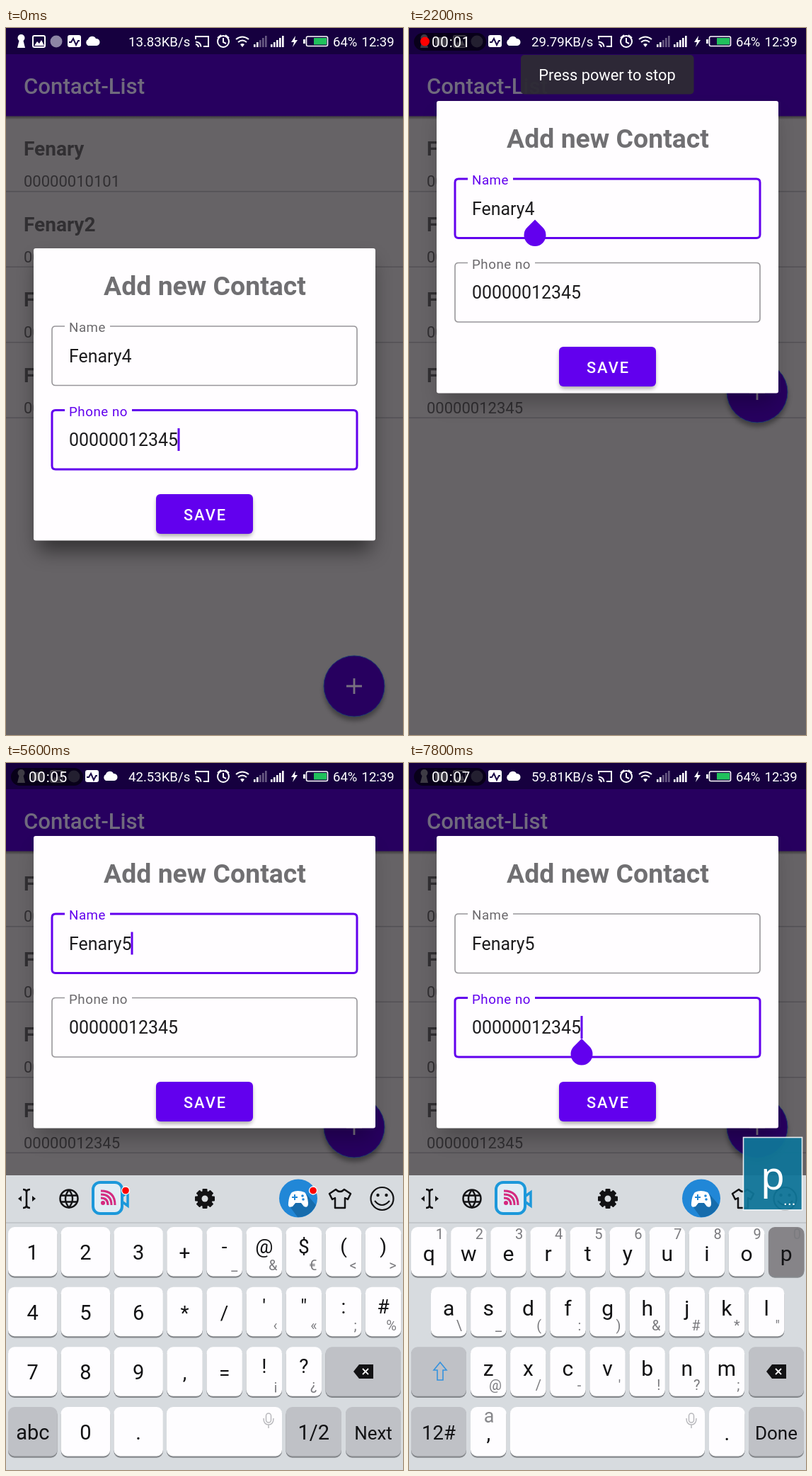
An HTML page that plays this animation: 561 by 998 pixels, repeating every 8 s.

```html
<!DOCTYPE html>
<html lang="en">
<head>
<meta charset="utf-8">
<title>Contact list</title>
<style>
  html, body { margin: 0; width: 100%; height: 100%; overflow: hidden; background: #666366; }
  svg { display: block; width: 100vw; height: 100vh; font-family: Roboto, sans-serif; }
  text { white-space: pre; }
</style>
</head>
<body>
<svg id="stage" viewBox="0 0 561 998">
  <defs>
    <filter id="soft" x="-30%" y="-30%" width="160%" height="160%"><feGaussianBlur stdDeviation="14"/></filter>
    <filter id="small" x="-30%" y="-30%" width="160%" height="160%"><feGaussianBlur stdDeviation="3"/></filter>
    <linearGradient id="barShade" x2="0" y2="1"><stop stop-opacity=".4"/><stop offset="1" stop-opacity="0"/></linearGradient>
  </defs>
  <g id="scene"></g>
</svg>
<script>
const LOOP = 8000, PURPLE = '#6200ee', NAME = 'Fenary', PHONE = '00000012345';
const scene = document.getElementById('scene');

const clamp = v => Math.max(0, Math.min(1, v));
const ramp = (t, from, to) => clamp((t - from) / (to - from));
const ease = v => 1 - (1 - v) ** 3;
const within = (t, a, b) => t >= a && t < b;
const at = (t, steps) => steps.filter(s => s[0] <= t).pop()[1];
const esc = s => s.replace(/&/g, '&amp;').replace(/</g, '&lt;');

const text = (x, y, s, size, fill = '#fff', extra = '') =>
  `<text x="${x}" y="${y}" font-size="${size}" fill="${fill}" ${extra}>${esc(s)}</text>`;
const rect = (x, y, w, h, fill, r = 0, extra = '') =>
  `<rect x="${x}" y="${y}" width="${w}" height="${h}" rx="${r}" fill="${fill}" ${extra}/>`;
const disc = (x, y, r, fill, extra = '') => `<circle cx="${x}" cy="${y}" r="${r}" fill="${fill}" ${extra}/>`;
const fillPath = (d, fill) => `<path d="${d}" fill="${fill}"/>`;
const line = (d, color, width = 2, extra = '') =>
  `<path d="${d}" fill="none" stroke="${color}" stroke-width="${width}" ${extra}/>`;
const move = (x, y, inner, scale = 1) => `<g transform="translate(${x} ${y}) scale(${scale})">${inner}</g>`;
const MID = 'text-anchor="middle"', END = 'text-anchor="end"', BOLD = 'font-weight="700"', MEDIUM = 'font-weight="500"';

// Status bar
function signal(x, lit) {
  return [0, 1, 2, 3, 4].map(i =>
    rect(x + i * 4, 23 - i * 3, 2.6, 4 + i * 3, '#fff', 0, `opacity="${i < lit ? 1 : .35}"`)).join('');
}

function statusBar(t) {
  const speed = at(t, [[0, '13.83'], [1200, '29.79'], [2600, '27.78'], [4600, '42.53'], [6400, '32.75'], [7600, '59.81']]);
  const extraIcon = t >= 2200, shift = extraIcon ? 25 : 0;
  let s = rect(0, 0, 561, 37, '#16003f');
  s += disc(21.5, 14, 5, '#fff') + fillPath('M19 16h5l3 12H16z', '#fff');
  if (extraIcon) s += rect(37, 13, 17, 12, '#fff', 2);
  s += move(shift, 0,
    line('M40 11h13a2 2 0 0 1 2 2v12a2 2 0 0 1-2 2H40a2 2 0 0 1-2-2V13a2 2 0 0 1 2-2z', '#fff') +
    fillPath('M40 25l4-6 3 3 3-5 4 8z', '#fff') + disc(71, 19, 8.5, '#8d86a5') +
    rect(87, 10, 19, 17, '#fff', 3) + line('M89 20h3l3-5 4 9 3-6h2', '#1c0b48') +
    fillPath('M116 25a5 5 0 0 1 0-9 6 6 0 0 1 11-1 5 5 0 0 1 1 10z', '#fff'));
  if (t >= 400) {
    s += rect(7, 7, 102, 25, '#05000d', 12.5, 'opacity=".77"');
    const sec = Math.max(0, Math.floor((t - 600) / 1000));
    if (Math.floor((t + 800) / 1000) % 2) s += disc(22.5, 19, 6.5, '#f00');
    s += text(32, 26.5, '00:0' + sec, 20.5, '#fff', 'letter-spacing=".8"');
  }
  s += text(173, 26, speed + 'KB/s', 18.6);
  s += line('M268 16v-4h18v14h-7M268 19.500q7 .5 7.500 7M268 23q3.500.5 4 4', '#fff');
  s += line('M307 14v6l4 2M299 14l5-4M315 14l-5-4', '#fff') + disc(307, 19, 8, 'none', 'stroke="#fff" stroke-width="2"');
  s += line('M325 16q9-7 18 0M328 20q6-5 12 0', '#fff') + fillPath('M331 23q3-2 6 0l-3 4z', '#fff');
  s += signal(350, 2) + signal(374, 5);
  s += fillPath('M409 11l-6 9h4l-2 7 7-10h-4z', '#fff');
  s += rect(424.5, 12, 30, 13.500, 'none', 2, 'stroke="#fff" stroke-width="1.6"') + rect(420, 16, 3, 6, '#fff') +
    rect(435, 14, 18, 9.500, '#20c05c');
  return s + text(462, 26, '64%', 18.5) + text(502.500, 26, '12:39', 18.5);
}

// Dimmed contact list
function contacts(lifted) {
  let s = rect(0, 0, 561, 998, '#666366') + rect(0, 37, 561, 87.500, '#27005f') +
    rect(0, 124.500, 561, 5, 'url(#barShade)') + text(25, 93, 'Contact-List', 31.2, '#706a7d', MEDIUM);
  ['', '2', '3', '4'].forEach((suffix, i) => {
    const y = i * 106.500;
    s += text(25, 180 + y, NAME + suffix, 28, '#312f32', BOLD) +
      text(25, 224 + y, i ? PHONE : '00000010101', 22, '#312f32') + rect(0, 230 + y, 561, 1.500, '#535155');
  });
  const y = lifted ? 514 : 929;
  return s + disc(492, y + 6, 43, '#000', 'opacity=".35" filter="url(#small)"') +
    disc(492, y, 43, '#27005f', 'stroke="#1d3c72" stroke-width="1"') +
    line(`M481 ${y}h22M492 ${y - 11}v22`, '#787080', 2.800);
}

// Dialog
function field(y, label, notch, value, focused) {
  const color = focused ? PURPLE : '#98969a';
  return line(`M${notch} ${y}H491q5 0 5 5v73.500q0 5-5 5H70q-5 0-5-5V${y + 5}q0-5 5-5H83`, color, focused ? 3 : 1.600) +
    text(89, y + 8, label, 18.7, focused ? PURPLE : '#6b696c', 'letter-spacing=".56"') +
    text(89, y + 50.500, value, 24.9, '#1d1c1e');
}

function dialog(t, lift) {
  const onPhone = t < 1000 || t >= 6000;
  const name = NAME + (t < 3400 ? '4' : t < 5400 ? '' : '5');
  const caretOn = at(t, [[0, 1], [400, 0], [1000, 1], [1400, 0], [2400, 1], [4800, 0], [5200, 1], [6800, 0], [7600, 1]]);
  const handleOn = within(t, 1000, 3400) || t >= 6000;
  const caretX = onPhone ? 244 : name.length > NAME.length ? 178 : 164;
  const dy = onPhone ? 118.500 : 0;
  let s = rect(45, 330, 471, 408, '#000', 4, `opacity="${.5 - .25 * lift}" filter="url(#soft)"`) +
    rect(39, 311, 483, 412.500, '#fffdff', 3) +
    text(281, 377, 'Add new Contact', 37.4, '#706f72', MID + ' ' + BOLD) +
    field(421, 'Name', 147, name, !onPhone) + field(539.500, 'Phone no', 178, PHONE, onPhone) +
    rect(213, 662, 135, 55, '#000', 6, 'opacity=".35" filter="url(#small)"') +
    rect(212, 658, 137, 56, PURPLE, 6) + text(251, 694.500, 'SAVE', 21.8, '#fff', MEDIUM + ' letter-spacing="1.95"');
  if (caretOn) s += rect(caretX - 1.500, 446.500 + dy, 3, 32, PURPLE);
  if (handleOn) s += move(caretX, 478.500 + dy, fillPath('M0 0L11 11A15.500 15.500 0 1 1-11 11Z', PURPLE));
  return move(0, -208 * lift, s);
}

// Keyboard
const ROWS = [655, 739.700, 824.300, 909], INK = '#121214', STEP = 56.1;

function key(x, row, w, label = '', o = {}) {
  const y = ROWS[row];
  const fill = o.pressed ? '#868488' : o.grey ? '#bfc1c6' : '#fefdff';
  let s = rect(x, y + 1.700, w, 70, '#85888c', 9) + rect(x, y, w, 69.500, fill, 9);
  s += text(x + w / 2, y + (o.base || 46), label, o.size || 29, INK, MID);
  if (o.hint) s += text(x + (o.top ? 46 : 44), y + (o.top ? 17 : 61), o.hint, 20, '#7b7b7f', END);
  return s;
}

const backspace = (x, y, scale = 1) => move(x, y,
  fillPath('M-14 0L-6-10H14V10H-6Z', INK) + line('M-1-4l8 8M7-4l-8 8', '#fff', 1.800), scale);
const mic = x => rect(x - 3.500, 918, 7, 13, 'none', 3.500, 'stroke="#b9b9bd" stroke-width="1.5"') +
  line(`M${x - 7} 925q0 9 7 9t7-9M${x} 934v5`, '#b9b9bd', 1.500);

function letterKeys(t) {
  const late = t >= 7400;
  const letters = (chars, hints, x, row, base) => [...chars].map((c, i) => key(x + i * STEP, row, 50.500, c, {
    hint: hints[i], top: !row, base, size: 30, pressed: t >= 7800 && c === 'p'
  })).join('');
  const accent = '#88888c';
  return letters('qwertyuiop', '1234567890', 3, 0, 48) +
    letters('asdfghjkl', '\\_(:)&#*"', 31, 1, 40) +
    key(3, 2, 78, '', { grey: 1 }) + line('M44 846l9 11h-5v14h-8v-14h-5z', '#3592de', 1.600) +
    letters('zxcvbnm', "@/-'!?;", 87, 2, 41) +
    key(480, 2, 78, '', { grey: 1, pressed: within(t, 3200, 3400) }) + backspace(519, 859) +
    key(3, 3, 78, '12#', { grey: 1, size: 27.5, pressed: within(t, 4200, 4400) }) +
    key(87, 3, 50.500, ',', { base: 47 }) + text(113, 931, 'a', 27, accent, MID) +
    (late ? '' : line('M110 932l5 5 9-9', accent)) +
    key(143, 3, 275) + mic(399) + key(424, 3, 50.500, '.', { base: 47 }) +
    key(480, 3, 78, late ? 'Done' : 'Next', { grey: 1, size: 26 });
}

function symbolKeys(t) {
  const rows = [['123', '+-@$()', ' _&€<>'], ['456', '*/\'":#', '  ‹«;%'], ['789', ',=!?', '  ¡¿']];
  let s = rows.map(([digits, signs, hints], row) =>
    [...digits].map((c, i) => key(3 + i * 74.700, row, 69.500, c, { pressed: c === '5' && within(t, 5200, 5400) })).join('') +
    [...signs].map((c, i) => {
      const hint = hints[i].trim();
      return key(227.300 + i * STEP, row, 50.500, c, { hint, base: hint ? 37 : 46, size: 28 });
    }).join('')).join('');
  return s + key(451.500, 2, 106.500, '', { grey: 1 }) + backspace(505, 859) +
    key(3, 3, 69.500, 'abc', { grey: 1 }) + key(77.700, 3, 69.500, '0') + key(152.400, 3, 69.500, '.') +
    key(227, 3, 163) + mic(371) + key(395.500, 3, 78.500, '1/2', { grey: 1 }) + key(480, 3, 78, 'Next', { grey: 1, size: 26 });
}

function numberKeys(t) {
  const rows = ['W123- ', 'P456+ ', 'N789()', ' *0#. '];
  return rows.map((chars, row) => [...chars].map((c, i) =>
    key(i ? 87 + (i - 1) * 95.300 : 3, row, i ? 90 : 78, c.trim(), {
      grey: !/\d/.test(c), pressed: !i && row === 3 && t >= 7200
    })).join('')).join('') +
    backspace(513.500, 690, 1.200) + line('M499 771v6h29v-6', INK) + text(513, 954, 'Done', 26, INK, MID) +
    fillPath('M27 941l14-13v7q15 1 18 22-7-12-18-11v7z', '#2b8ce4');
}

function toolbar(t) {
  const teeth = Array.from({ length: 8 }, (_, i) => rect(-3.500, -14, 7, 8, INK, 1, `transform="rotate(${i * 45})"`)).join('');
  const blue = '#1c98da', pink = '#d42a80';
  let s = rect(0, 648, 561, 2, '#c3c7cb');
  s += line('M24 602q5 0 5 4v18q0 4-5 4M34 602q-5 0-5 4v18q0 4 5 4', INK, 2.600) +
    fillPath('M17 615l5-4v8zM42 615l-5-4v8z', INK);
  s += disc(89, 615, 12.500, 'none', `stroke="${INK}" stroke-width="2.5"`) +
    line('M77 610.500h24M77 619.500h24M89 602.500q-10 12.500 0 25q10-12.500 0-25', INK, 2.300);
  s += rect(123, 592, 41, 44, '#e0edf5', 10, `stroke="${blue}" stroke-width="4"`) +
    line('M165 611l7-5v19l-7-5', blue, 3.500) + disc(137, 621, 3, pink) +
    line('M134 614q10 0 10 10M134 609q15 0 15 15M134 604q20 0 20 20', pink, 3);
  s += move(281, 615, teeth + disc(0, 0, 11, INK) + disc(0, 0, 4.500, '#d8dce0'));
  s += disc(413, 614.500, 27, '#2187d7') + fillPath('M401 626l11 15q18 0 26-17l-13-15z', '#176cac') +
    fillPath('M404 606q8-4 18 0 4 4 5 15 0 8-6 5l-4-5h-8l-4 5q-7 3-6-5 1-11 5-15z', '#fff') +
    line('M404 613h8M408 609v8', '#2187d7') + disc(419, 611, 1.800, '#2187d7') + disc(420, 616, 1.800, '#2187d7');
  s += line('M466 602q6 6 12 0l9 6-4 8-4-2v14h-14v-14l-4 2-4-8z', INK, 2.500, 'stroke-linejoin="round"');
  s += disc(531.500, 615, 16, 'none', `stroke="${INK}" stroke-width="2.2"`) +
    disc(525.500, 610, 2.200, INK) + disc(537.500, 610, 2.200, INK) + line('M521 618q10 12 21 0', INK);
  if (t < 7400) s += [169, 434].map(x => disc(x, 603.500, 5.500, '#f00', 'stroke="#fff" stroke-width="1.3"')).join('');
  return s;
}

function popup(x, y, label, size, more = '') {
  return rect(x, y, 83, 102.500, '#0f7598', 0, 'opacity=".94" stroke="#f4f8fa" stroke-width="1.6"') +
    text(x + 41.500, y + (size > 50 ? 73 : 67), label, size, '#fff', MID + ' font-family="Noto Sans, sans-serif"') +
    text(x + 74, y + 95, more, 22, '#fff', END);
}

function keyboard(t) {
  if (t < 2250) return '';
  const keys = within(t, 4400, 6400) ? symbolKeys : within(t, 6400, 7400) ? numberKeys : letterKeys;
  let s = rect(0, 582, 561, 416, '#d7dbdf') + toolbar(t) + keys(t);
  if (within(t, 4200, 4400)) s += popup(5.500, 782.500, '12#', 37);
  if (within(t, 5200, 5400)) s += popup(71, 613, '5', 55);
  if (t >= 7800) s += popup(472.500, 528.500, 'p', 55, '...');
  return move(0, 416 * (1 - ease(ramp(t, 2250, 2390))), s);
}

function toast(t) {
  const alpha = ramp(t, 400, 600) * (1 - ramp(t, 2400, 2580));
  return alpha ? `<g opacity="${alpha}">` + rect(158, 38, 244.500, 55.500, '#2d2a35', 5, 'opacity=".96"') +
    text(280, 74, 'Press power to stop', 21.8, '#fff', MID) + '</g>' : '';
}

let shown = '';
function render(t) {
  const lift = ease(ramp(t, 1980, 2180));
  const markup = contacts(lift > 0) + statusBar(t) + dialog(t, lift) + keyboard(t) + toast(t);
  if (markup !== shown) scene.innerHTML = shown = markup;
}

const start = performance.now();
function tick() {
  render((performance.now() - start) % LOOP);
  requestAnimationFrame(tick);
}
tick();
</script>
</body>
</html>
```
